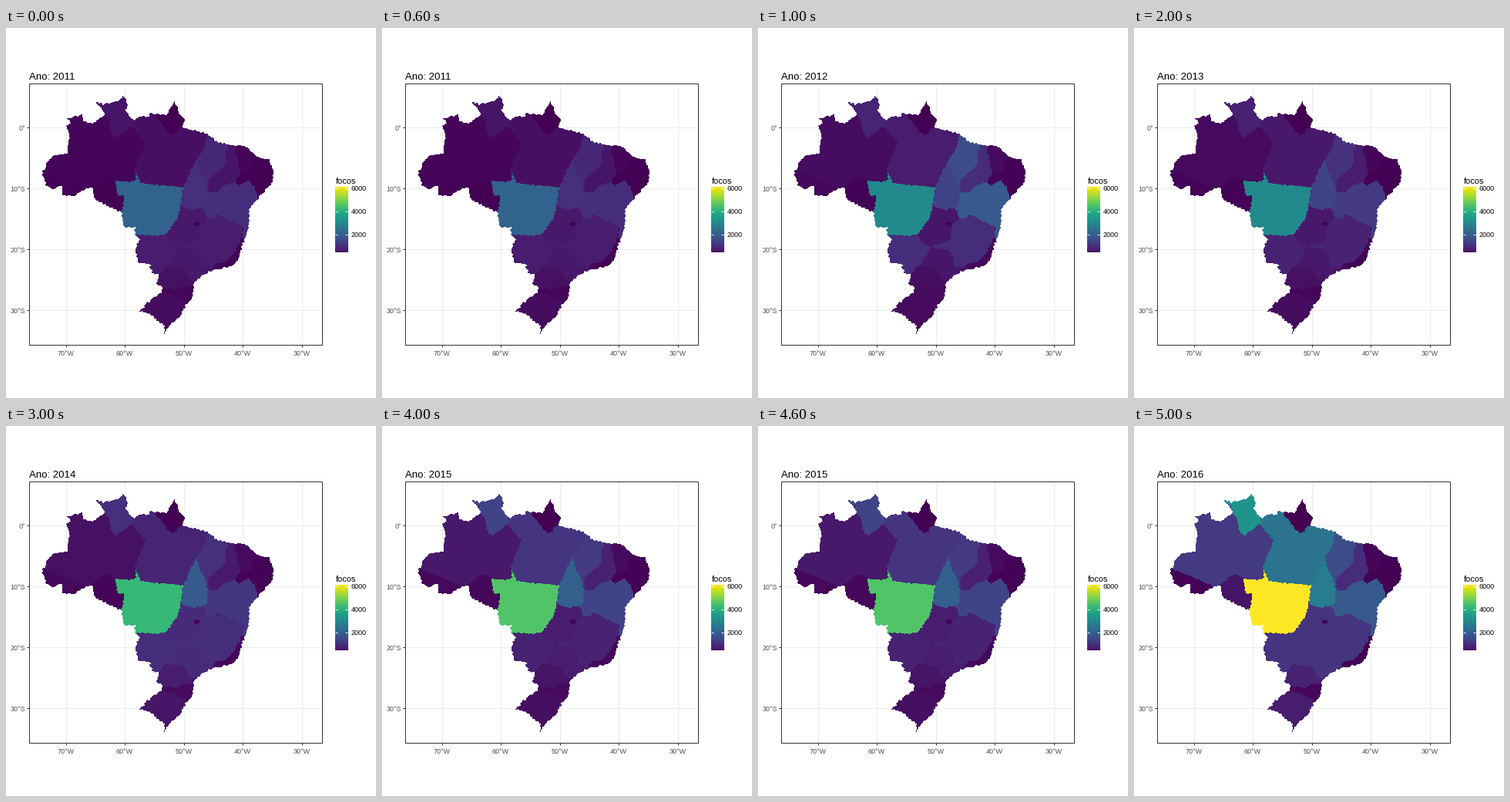
A matplotlib script that plays this animation: 480 px wide and 480 px high, repeating every 6 s.

```python
import math
import random

import matplotlib.pyplot as plt
import numpy as np
from matplotlib.animation import FuncAnimation
from matplotlib.path import Path
from matplotlib.patches import Rectangle

plt.rcParams["font.family"] = "Liberation Sans"
SIZE, DPI = 480, 72
YEARS = range(2011, 2017)
CMAP = plt.get_cmap("viridis")

# Yearly trend of each region, as a fraction of the colour scale
CORE = np.array([32, 48, 48, 67, 73, 100]) / 100
NORTH = np.array([5, 9, 8, 12, 18, 45]) / 100
EAST = np.array([13, 28, 17, 16, 20, 28]) / 100
MIDDLE = np.array([8, 13, 10, 13, 10, 15]) / 100
SOUTH = np.array([7, 6, 7, 12, 8, 15]) / 100
QUIET = np.array([1, 2, 1, 2, 2, 1]) / 100

COAST = [(165, 120), (173, 115), (185, 115), (187, 110), (193, 112),
         (208, 113), (219, 95), (224, 111), (232, 119), (229, 129),
         (262, 138), (273, 147), (294, 152), (309, 153), (328, 168),
         (342, 171), (347, 189), (345, 201), (327, 221), (316, 234),
         (315, 258), (309, 275), (300, 303), (291, 310), (272, 313),
         (258, 319), (243, 331), (242, 349), (232, 362), (226, 374),
         (214, 384), (205, 396)]
FRONTIER = [(207, 388), (197, 379), (185, 371), (173, 368), (187, 353),
            (202, 343), (203, 336), (195, 332), (199, 320), (189, 318),
            (187, 307), (171, 304), (168, 289), (173, 274), (167, 266),
            (167, 258), (153, 258), (150, 239), (137, 234), (115, 222),
            (113, 207), (104, 208), (90, 217), (73, 217), (73, 205),
            (60, 209), (53, 204), (47, 189), (56, 170), (64, 165),
            (79, 163), (82, 138), (78, 126), (84, 124), (79, 117),
            (98, 113), (101, 121), (112, 124), (129, 113), (117, 96),
            (130, 99), (144, 95), (153, 88), (158, 101), (155, 108)]

# Pixel centres, nudged by short random waves so every border looks ragged
rng = random.Random(5)
px, py = np.meshgrid(np.arange(SIZE) + 0.5, np.arange(SIZE) + 0.5)


def waves(count=5, amp=0.35):
    total = np.zeros_like(px)
    for _ in range(count):
        angle, freq = rng.uniform(0, math.pi), rng.uniform(0.5, 1.4)
        phase = px * math.cos(angle) + py * math.sin(angle)
        total += amp * np.sin(freq * phase + rng.uniform(0, 6))
    return total


spots = np.column_stack([(px + waves()).ravel(), (py + waves()).ravel()])


def inside(points):
    return Path(points).contains_points(spots).reshape(SIZE, SIZE)


# The first state fills the whole land; each later one is cut out of it
land = inside(COAST + FRONTIER)
zone = np.zeros((SIZE, SIZE), dtype=int)
levels = [NORTH * 0.38]


def state(level, *points):
    zone[inside(points)] = len(levels)
    levels.append(level)


# Para, Amapa, Roraima, Acre, Rondonia
state(NORTH * 0.85, (165, 100), (163, 128), (181, 148), (167, 183), (172, 210),
      (250, 220), (280, 120), (240, 90))
state(QUIET * 0, (193, 90), (193, 112), (204, 127), (216, 140), (230, 127),
      (240, 90))
state(NORTH * 1.15, (105, 85), (125, 104), (135, 125), (137, 138), (144, 141),
      (155, 134), (165, 125), (162, 80))
state(QUIET, (40, 182), (104, 208), (104, 225), (40, 225))
state(NORTH * 0.13, (110, 208), (127, 194), (133, 193), (160, 205), (160, 245),
      (105, 235))

# Maranhao, Piaui, Ceara, small eastern states
state(EAST * 0.85, (262, 130), (257, 157), (247, 171), (255, 210), (310, 215),
      (310, 140))
state(EAST * 0.45, (294, 140), (285, 160), (284, 178), (262, 198), (261, 220),
      (310, 220), (310, 140))
state(QUIET * 1.5, (298, 140), (297, 159), (304, 189), (340, 190), (330, 150))
state(QUIET * 0.5, (329, 160), (318, 181), (318, 188), (304, 188), (297, 200),
      (310, 230), (360, 230), (360, 160))

# Goias, Sao Paulo, Mato Grosso do Sul, Parana
state(SOUTH, (200, 225), (265, 225), (265, 290), (200, 290))
state(SOUTH, (200, 310), (224, 284), (300, 284), (300, 330), (200, 335))
state(MIDDLE, (160, 262), (207, 270), (216, 281), (224, 284), (214, 302),
      (199, 322), (160, 325))
state(SOUTH * 0.65, (207, 308), (225, 311), (233, 314), (237, 325), (247, 329),
      (242, 337), (220, 343), (185, 337), (185, 322), (199, 320))

# Rio Grande do Sul, Santa Catarina
state(SOUTH * 0.5, (160, 342), (260, 342), (260, 400), (160, 400))
state(QUIET * 1.5, (190, 336), (220, 340), (231, 335), (250, 335), (250, 361),
      (231, 361), (233, 355), (216, 346), (190, 344))

# Rio de Janeiro, Espirito Santo, Minas Gerais, Bahia
state(QUIET, (270, 300), (310, 280), (310, 320), (270, 320))
state(QUIET, (290, 270), (325, 265), (325, 297), (290, 297))
state(MIDDLE, (262, 246), (251, 258), (249, 275), (224, 284), (249, 288),
      (257, 311), (288, 302), (297, 290), (306, 272), (310, 240))
state(EAST, (259, 212), (271, 214), (285, 204), (297, 199), (302, 204),
      (314, 198), (322, 206), (327, 221), (340, 230), (330, 275), (306, 272),
      (309, 258), (277, 243), (262, 248), (254, 230))

# Mato Grosso, Tocantins, Distrito Federal
state(CORE, (142, 199), (167, 199), (169, 187), (174, 201), (230, 207),
      (226, 232), (222, 247), (207, 268), (196, 269), (175, 269), (140, 270),
      (150, 238), (154, 218), (144, 216))
state(CORE * 0.42, (248, 170), (251, 186), (257, 195), (262, 210), (260, 232),
      (243, 236), (227, 232), (230, 208), (235, 196), (240, 184))
state(QUIET * 0, (244, 252), (251, 252), (251, 256), (244, 256))

levels = np.array(levels)

fig = plt.figure(figsize=(SIZE / DPI, SIZE / DPI), dpi=DPI, facecolor="white")
ax = fig.add_axes([0, 0, 1, 1])
ax.axis("off")


def line(x0, y0, x1, y1, color, z=1):
    ax.plot([x0, x1], [y0, y1], color=color, lw=1, zorder=z,
            solid_capstyle="butt")


def label(x, y, s, size, color="black", ha="left"):
    return ax.text(x, y, s, fontsize=size, color=color, ha=ha, va="baseline")


# Panel, grid and axes
for k in range(5):
    x = int(78 + 76.5 * k)
    line(x, 72, x, 411, "#ebebeb")
    line(x, 411, x, 414, "#333333")
    label(x, 425, f"{70 - 10 * k}°W", 9, "#4d4d4d", "center")
for k in range(4):
    y = 129 + 79 * k
    line(30, y, 410, y, "#ebebeb")
    line(27, y, 30, y, "#333333")
    label(25, y + 4, f"{10 * k}°S" if k else "0°", 9, "#4d4d4d", "right")
ax.add_patch(Rectangle((30, 72), 380, 339, fill=False, ec="#333333", lw=1,
                       zorder=6))

# Legend
label(428, 202, "focos", 11)
ramp = np.linspace(0.99, 0.05, 85).reshape(-1, 1)
ax.imshow(ramp, cmap=CMAP, vmin=0, vmax=1, extent=(427, 444, 291, 206),
          aspect="auto", zorder=3)
for k in range(3):
    y = 208 + 30 * k
    line(427, y, 430, y, "white", 5)
    line(440, y, 443, y, "white", 5)
    label(448, y + 3, str(6000 - 2000 * k), 9)

title = label(30, 67, "", 13.2)
chart = ax.imshow(np.zeros((SIZE, SIZE, 4)), extent=(0, SIZE, SIZE, 0),
                  aspect="auto", interpolation="nearest", zorder=2)
ax.set_xlim(0, SIZE)
ax.set_ylim(SIZE, 0)


def update(i):
    title.set_text(f"Ano: {YEARS[i]}")
    image = CMAP(levels[:, i])[zone]
    image[..., 3] = land
    chart.set_data(image)
    return title, chart


anim = FuncAnimation(fig, update, frames=len(YEARS), interval=1000,
                     repeat=True, repeat_delay=0)
plt.show()
```
